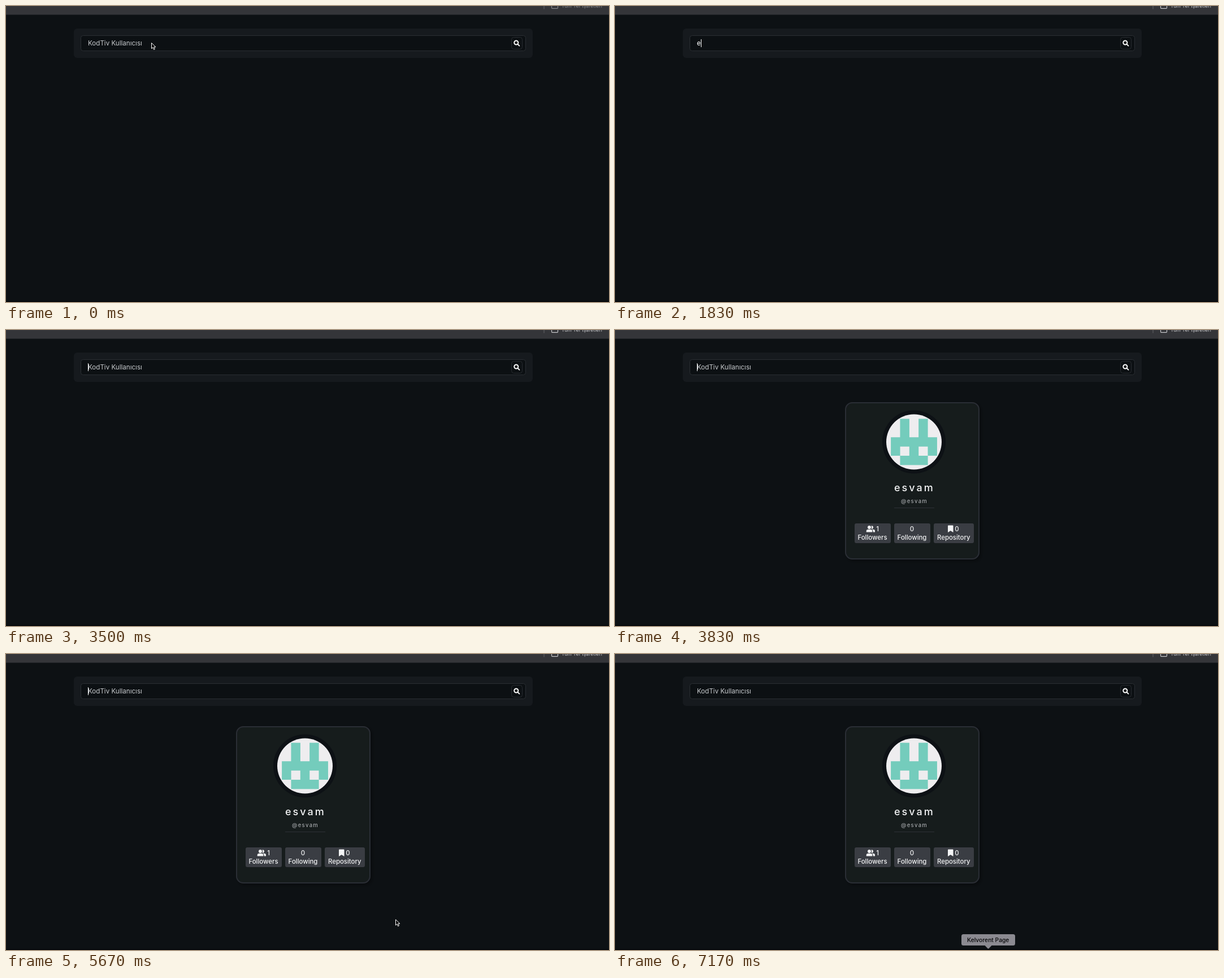
Write an HTML page that moves like this. It is 1067 by 525 pixels and loops after 7340 ms.

```html
<!DOCTYPE html>
<html lang="tr">
<head>
<meta charset="utf-8">
<title>Kullanıcı arama</title>
<style>
  html, body { margin: 0; width: 100%; height: 100%; overflow: hidden; background: #0d1114; }
  svg { display: block; width: 1067px; height: 525px; font-family: Inter, "Open Sans", sans-serif; }
  .bar { --ink: #858689; }
  .bar.active { --ink: #c5c6c9; }
  .bar text { fill: var(--ink); font-size: 8.7px; }
  .bar path { stroke: var(--ink); fill: none; }
  .field { font-size: 11.6px; fill: #c8cbce; }
  .typed { font-size: 11.2px; font-weight: 500; fill: #f4f5f6; }
  .name { font-size: 18px; font-weight: 500; letter-spacing: 3px; fill: #f3f4f5; }
  .handle { font-size: 9.5px; font-weight: 500; letter-spacing: 1.3px; fill: #a3a6a9; }
  .stats { font-size: 11.4px; font-weight: 500; fill: #f3f4f5; text-anchor: middle; }
  .stats rect { fill: #3a3d43; }
  .tip { font-size: 10.3px; font-weight: 500; text-anchor: middle; }
</style>
</head>
<body>
<svg viewBox="0 0 1067 525">
  <defs>
    <filter id="shade" x="-10%" y="-10%" width="125%" height="125%">
      <feDropShadow dx="3" dy="3" stdDeviation="3" flood-color="#000" flood-opacity=".35"/>
    </filter>
  </defs>

  <rect width="1067" height="525" fill="#0d1114"/>
  <rect y="523.5" width="1067" height="1.5" fill="#050608"/>
  <rect width="1067" height="15.5" fill="#343539"/>
  <g class="bar" id="bar">
    <path d="M952 0V5.5" style="stroke:#65666a"/>
    <path d="M965.5 -4V3Q965.5 4.3 966.8 4.3H975.2Q976.5 4.3 976.5 3V-4" stroke-width="1.2"/>
    <text x="983" y="3">Tüm Yer İşaretleri</text>
  </g>

  <rect x="120" y="40" width="812" height="52" rx="6" fill="#161a1e"/>
  <rect x="132.5" y="52.5" width="787" height="27" rx="4" fill="#0c1013" stroke="#2a2e33"/>
  <rect x="894.5" y="55.5" width="19" height="21" rx="4" fill="#0c1013" stroke="#282c31"/>
  <g fill="none" stroke="#fff" stroke-width="2">
    <circle cx="902.8" cy="65" r="3.5"/>
    <path d="M905.4 67.6L908.4 70.6" stroke-linecap="round"/>
  </g>
  <text class="field" id="hint" x="145" y="70">KodTiv Kullanıcısı</text>
  <text class="typed" id="typed" x="145" y="70"></text>
  <rect id="caret" y="59" width="1" height="14" fill="#fff"/>

  <g id="card">
    <rect x="408" y="129" width="236" height="277" rx="12" fill="#171a1f" stroke="#2b2f34" stroke-width="2" filter="url(#shade)"/>
    <circle cx="529" cy="198.5" r="56" fill="#0d1115"/>
    <circle cx="529" cy="198.5" r="49" fill="#eeedef"/>
    <path id="avatar" fill="#74ccbc"/>
    <text class="name" x="494" y="286">esvam</text>
    <text class="handle" x="506" y="307">@esvam</text>
    <path d="M494 315.5H565" stroke="#2d3136"/>
    <g class="stats">
      <rect x="424" y="343" width="64" height="35" rx="3"/>
      <rect x="494" y="343" width="64" height="35" rx="3"/>
      <rect x="564" y="343" width="71" height="35" rx="3"/>
      <text x="464.5" y="357">1</text>
      <text x="525.5" y="357">0</text>
      <text x="605" y="357">0</text>
      <text x="455.5" y="372">Followers</text>
      <text x="525.5" y="372">Following</text>
      <text x="599.3" y="372">Repository</text>
      <circle cx="450" cy="350" r="3"/>
      <path d="M444.7 358.5V357Q444.7 353.8 448 353.8H452Q455.3 353.8 455.3 357V358.5Z"/>
      <path d="M453.6 347.4A2.7 2.7 0 1 1 453.6 352.6Q454.8 350 453.6 347.4Z"/>
      <path d="M454.6 353.8H457Q460 353.8 460 357V358.5H456.6V357Q456.6 355 454.6 353.8Z"/>
      <path d="M589 347.5Q589 346.5 590 346.5H597.5Q598.5 346.5 598.5 347.5V359L593.75 356L589 359Z"/>
    </g>
  </g>

  <g class="tip" id="tip">
    <path d="M654 516.5H667L661.5 522.3Q660.5 523.2 659.5 522.3Z" fill="#8b8a91"/>
    <rect x="613" y="497" width="95" height="20" rx="3.5" fill="#8b8a91"/>
    <text x="660.2" y="511" fill="#08080a">Kelvorent Page</text>
  </g>

  <g id="mouse" stroke-linejoin="round">
    <path id="arrow" d="M.5 .5V10.6L2.9 8.4L4.6 12.3L6.4 11.5L4.7 7.8H8Z" fill="#050607" stroke="#fff"/>
    <g id="beam" fill="none" stroke-linecap="round">
      <path id="stem" d="M-3.5 -6.5H-1.5Q0 -6.5 0 -5Q0 -6.5 1.5 -6.5H3.5M0 -5V5M-3.5 6.5H-1.5Q0 6.5 0 5Q0 6.5 1.5 6.5H3.5M-1.7 2H1.7" stroke="#000" stroke-width="2.6"/>
      <use href="#stem" id="glow"/>
      <path d="M-3.5 -6.5H-1.5Q0 -6.5 0 -5Q0 -6.5 1.5 -6.5H3.5M0 -5V5M-3.5 6.5H-1.5Q0 6.5 0 5Q0 6.5 1.5 6.5H3.5M-1.7 2H1.7" stroke="#fff" stroke-width="1.2"/>
    </g>
  </g>
</svg>
<script>
  const LOOP = 7340, STEPS = 44, USER = "esvam";
  const el = id => document.getElementById(id);
  const show = (id, on) => { el(id).style.display = on ? "" : "none"; };
  el("glow").remove();

  // Mirrored 5 x 5 avatar
  const cell = 16.35;
  el("avatar").setAttribute("d", [".#.#.", ".#.#.", "#####", "#.#.#", ".###."]
    .flatMap((row, r) => [...row].map((c, i) => c === "#"
      ? `M${488.1 + i * cell} ${157.6 + r * cell}h${cell + .1}v${cell + .1}h-${cell + .1}z` : ""))
    .join(""));

  // Pointer path: time, x, y
  const path = [
    [0, 257, 65], [170, 257, 67], [500, 258, 70], [670, 256, 67], [4000, 256, 67],
    [4330, 310, 112], [4670, 570, 306], [4830, 652, 393], [5000, 674, 444],
    [5670, 689, 470.5], [6000, 690, 472], [6170, 688, 477], [6500, 668, 530], [LOOP, 660, 545]
  ];
  function pointer(t) {
    const i = Math.max(1, path.findIndex(p => p[0] >= t));
    const [a, b] = [path[i - 1], path[i]];
    const k = (t - a[0]) / (b[0] - a[0]);
    return [a[1] + (b[1] - a[1]) * k, a[2] + (b[2] - a[2]) * k];
  }

  const typedLength = t =>
    t < 1830 || t >= 3500 ? 0 : t < 2000 ? 1 : t < 2170 ? 2 : t < 2330 ? 4 : 5;

  function caretOn(t) {
    if (t < 670) return false;
    if (t < 1830) return t < 1170 || t >= 1670;
    if (t < 3500) return t < 3000 || t >= 3330;
    return (t - 3500) % 1000 < 500;
  }

  function draw(t) {
    const text = USER.slice(0, typedLength(t));
    el("bar").classList.toggle("active", t >= 670);
    el("typed").textContent = text;
    show("hint", !text);
    show("caret", caretOn(t));
    el("caret").setAttribute("x", text ? Math.round(145 + el("typed").getComputedTextLength()) : 145);
    show("card", t >= 3830);
    show("tip", t >= 6670);

    const [x, y] = pointer(t);
    const inField = t >= 670 && y < 80;
    show("mouse", t < 1830 || t >= 4170);
    show("arrow", !inField);
    show("beam", inField);
    el("mouse").setAttribute("transform", `translate(${x} ${y})`);
  }

  const startOf = n => Math.round(n * 50 / 3) * 10;
  let t0 = performance.now();
  function tick(now) {
    const t = Math.max(0, now - t0) % LOOP;
    let n = Math.min(STEPS - 1, Math.floor(t * 3 / 500) + 1);
    while (startOf(n) > t) n--;
    draw(startOf(n));
    requestAnimationFrame(tick);
  }
  draw(0);
  requestAnimationFrame(tick);
</script>
</body>
</html>
```
